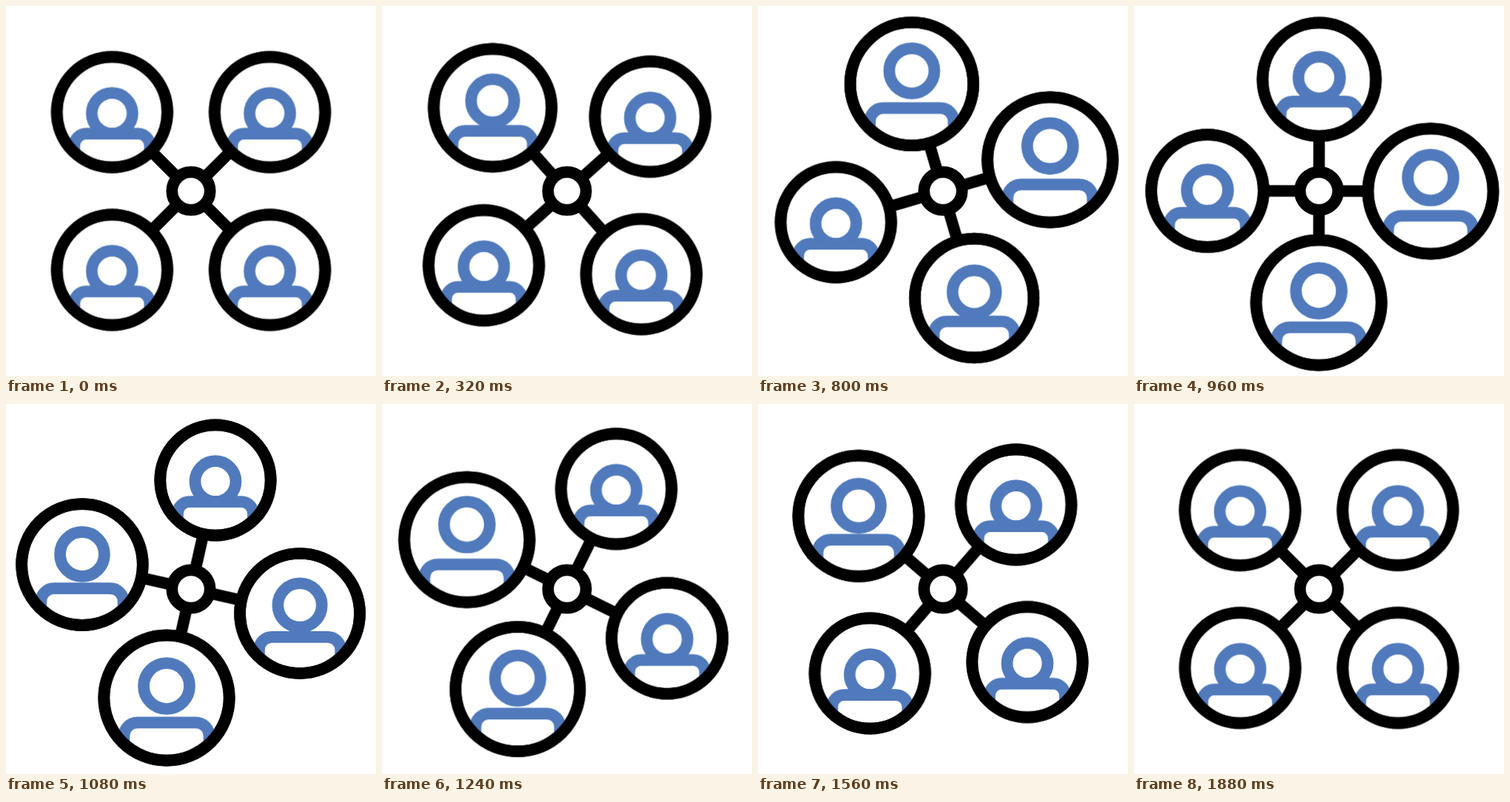
Recreate the animation shown at these times as an HTML page without scripts. Size 500 by 500 pixels, loop 1.92 s.

```html
<!DOCTYPE html>
<html lang="en">
<head>
<meta charset="utf-8">
<title>Connected people</title>
<style>
html, body { margin: 0; width: 100%; height: 100%; overflow: hidden; background: #fff; }
svg { display: block; width: 100%; height: 100%; }
circle, path { stroke-width: 15.7; }
.link { stroke: #000; }
.ring, .hub { fill: #fff; stroke: #000; }
.ring-line { fill: none; stroke: #000; }
.head, .body { fill: none; stroke: #507abc; }
.ring, .ring-line { r: 74.7px; }
.head { r: 27.5px; cy: 1.7px; }
.body { d: path("M-51 53V45.2A16 16 0 0 1 -35 29.2H35A16 16 0 0 1 51 45.2V53"); }

.spin, .upright { animation: turn 1920ms cubic-bezier(.565, 0, .435, 1) infinite; }
.upright { animation-name: unturn; }
@keyframes turn { to { transform: rotate(90deg); } }
@keyframes unturn { to { transform: rotate(-90deg); } }

.ring, .ring-line, .head, .body {
  animation: swell 1920ms cubic-bezier(.333, 0, .667, 1) var(--start) infinite;
}
.head { animation-name: lift; }
.body { animation-name: widen; }

/* grow for 280 ms, hold for 260 ms, settle for 330 ms */
@keyframes swell {
  0%, 45.3%, 100% { r: 74.7px; }
  14.6%, 28.1% { r: 84.7px; }
}
@keyframes lift {
  0%, 45.3%, 100% { r: 27.5px; cy: 1.7px; }
  14.6%, 28.1% { r: 31px; cy: var(--top); }
}
@keyframes widen {
  0%, 45.3%, 100% { d: path("M-51 53V45.2A16 16 0 0 1 -35 29.2H35A16 16 0 0 1 51 45.2V53"); }
  14.6%, 28.1% { d: path("M-57.5 60V51.3A18 18 0 0 1 -39.5 33.3H39.5A18 18 0 0 1 57.5 51.3V60"); }
}

.a { --start: 182ms; --top: -21px; }
.b { --start: 405ms; --top: -18.6px; }
.c { --start: 650ms; --top: -16px; }
.d { --start: 900ms; --top: -20.5px; }
</style>
</head>
<body>
<svg viewBox="0 0 500 500">
  <g transform="translate(250 250)">
    <g class="spin">
      <path class="link" d="M-80 -80L80 80M80 -80L-80 80"/>
      <g class="a" transform="translate(-106.6 -106.6)">
        <g class="upright">
          <circle class="ring"/>
          <path class="body"/>
          <circle class="head"/>
          <circle class="ring-line"/>
        </g>
      </g>
      <g class="b" transform="translate(106.6 -106.6)">
        <g class="upright">
          <circle class="ring"/>
          <path class="body"/>
          <circle class="head"/>
          <circle class="ring-line"/>
        </g>
      </g>
      <g class="c" transform="translate(106.6 106.6)">
        <g class="upright">
          <circle class="ring"/>
          <path class="body"/>
          <circle class="head"/>
          <circle class="ring-line"/>
        </g>
      </g>
      <g class="d" transform="translate(-106.6 106.6)">
        <g class="upright">
          <circle class="ring"/>
          <path class="body"/>
          <circle class="head"/>
          <circle class="ring-line"/>
        </g>
      </g>
    </g>
    <circle class="hub" r="25.7"/>
  </g>
</svg>
</body>
</html>
```
